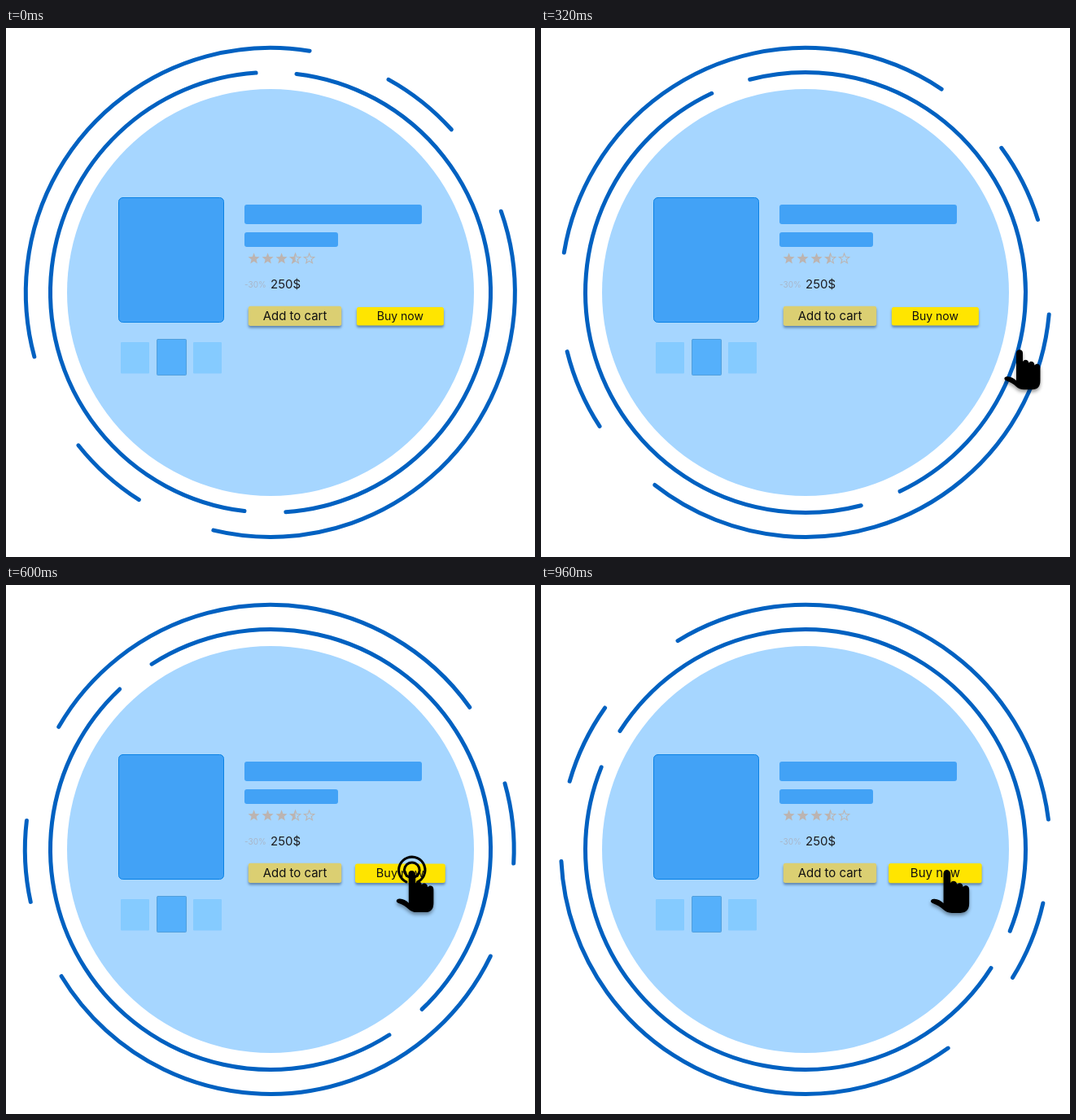
An HTML page with a canvas for the animation above (1 s loop, 650x650 px).

```html
<!DOCTYPE html>
<html lang="en">
<head>
<meta charset="utf-8">
<title>Buy now</title>
<style>
  html, body { margin: 0; width: 100%; height: 100%; overflow: hidden; background: #fff; }
  canvas { display: block; width: 650px; height: 650px; }
</style>
</head>
<body>
<canvas id="stage" width="650" height="650"></canvas>
<script>
const ctx = document.getElementById('stage').getContext('2d');
const LOOP = 1000, STEP = 40;
const RING = '#0061c1', BLUE = '#42a2f6', GREY = '#bcb4b1', INK = '#1c1c1e';
const clamp = v => Math.max(0, Math.min(1, v));
const lerp = (a, b, p) => a + (b - a) * p;

// Standard ease-in-out: cubic-bezier(.42, 0, .58, 1)
function easeInOut(x) {
  if (x <= 0 || x >= 1) return clamp(x);
  let lo = 0, hi = 1, s = 0.5;
  for (let i = 0; i < 20; i++) {
    s = (lo + hi) / 2;
    const bx = 3 * s * (1 - s) * (1 - s) * 0.42 + 3 * s * s * (1 - s) * 0.58 + s * s * s;
    if (bx < x) lo = s; else hi = s;
  }
  return s * s * (3 - 2 * s);
}

function arc(r, from, to, turn) {
  const rad = Math.PI / 180;
  ctx.beginPath();
  ctx.arc(325, 325, r, (from + turn) * rad, (to + turn) * rad);
  ctx.stroke();
}

function box(x, y, w, h, r, fill, line) {
  ctx.beginPath();
  ctx.roundRect(x, y, w, h, r);
  ctx.fillStyle = fill;
  ctx.fill();
  if (line) {
    ctx.strokeStyle = line;
    ctx.lineWidth = 1;
    ctx.stroke();
  }
}

function text(str, x, y, size, fill, align = 'left') {
  ctx.font = `${size}px Inter, sans-serif`;
  ctx.textAlign = align;
  ctx.fillStyle = fill;
  ctx.fillText(str, x, y);
}

function shadow(color, y, blur) {
  ctx.shadowColor = color;
  ctx.shadowOffsetY = y;
  ctx.shadowBlur = blur;
}

function rings(frame) {
  const out = frame * 1.2935, inn = -frame * 1.127;
  ctx.strokeStyle = RING;
  ctx.lineWidth = 5;
  ctx.lineCap = 'round';
  arc(300.7, 164.8, 279.2, out);
  arc(299.2, -61, -42, out);
  arc(300.4, -19.4, 103.5, out);
  arc(301.7, 122.4, 141.5, out);
  arc(270.5, 96.8, 266.2, inn);
  arc(270.5, -83.2, 86, inn);
}

function starPath(x, y, R) {
  ctx.beginPath();
  for (let i = 0; i < 10; i++) {
    const a = i * Math.PI / 5 - Math.PI / 2, r = i % 2 ? R * 0.43 : R;
    ctx.lineTo(x + r * Math.cos(a), y + r * Math.sin(a));
  }
  ctx.closePath();
}

// fill: share of the star that is solid, from the left
function star(x, fill) {
  const y = 283.6;
  ctx.fillStyle = ctx.strokeStyle = GREY;
  ctx.lineWidth = 1.1;
  ctx.save();
  ctx.beginPath();
  ctx.rect(x - 8, y - 8, 16 * fill, 16);
  ctx.clip();
  starPath(x, y, 7.4);
  ctx.fill();
  ctx.restore();
  if (fill < 1) {
    starPath(x, y, 6.5);
    ctx.stroke();
  }
}

function button(label, cx, cy, scale, fill) {
  ctx.save();
  ctx.translate(cx, cy);
  ctx.scale(scale, scale);
  ctx.save();
  shadow('rgba(30,60,100,.5)', 2.5, 3);
  box(-53.5, -11.3, 107, 22.6, 2.5, fill);
  ctx.restore();
  text(label, 0, 4.4, 14, '#111', 'center');
  ctx.restore();
}

function product(hover) {
  ctx.beginPath();
  ctx.arc(325, 325, 250, 0, Math.PI * 2);
  ctx.fillStyle = '#a6d6ff';
  ctx.fill();

  box(138.5, 208.5, 129, 153, 5, BLUE, '#0b82e4');
  box(141, 386, 35, 38.5, 1, '#85cbff');
  box(185.5, 382.5, 36, 44, 1, '#55b0fb', '#519fdc');
  box(230, 386, 35, 38.5, 1, '#85cbff');
  box(293, 217, 218, 24, 3, BLUE);
  box(293, 251, 115, 18, 3, BLUE);

  [1, 1, 1, 0.5, 0].forEach((fill, i) => star(304.6 + i * 17, fill));
  text('-30%', 293, 319, 10, '#a9b6c8');
  text('250$', 325, 320, 15, INK);

  button('Add to cart', 355, 353.9, 1.07, '#dbcf72');
  button('Buy now', 484.4, 354.2, lerp(1, 1.07, hover), '#ffe500');
}

function hand() {
  ctx.beginPath();
  ctx.moveTo(-7.5, 13);
  ctx.lineTo(-7.5, -21);
  ctx.bezierCurveTo(-7.5, -26.3, 0.5, -26.3, 0.5, -21);
  ctx.lineTo(0.5, -10);
  ctx.bezierCurveTo(1.5, -13.5, 7.5, -13.5, 8, -8.5);
  ctx.bezierCurveTo(9.5, -11.5, 14.7, -11, 15, -5.8);
  ctx.bezierCurveTo(17, -8.5, 22, -8, 22, -3);
  ctx.lineTo(22, 13);
  ctx.quadraticCurveTo(22, 24, 12, 24);
  ctx.lineTo(2, 24);
  ctx.quadraticCurveTo(-4, 24, -8, 20);
  ctx.quadraticCurveTo(-12, 16, -20, 13);
  ctx.bezierCurveTo(-24, 11, -21.5, 7.5, -18, 8);
  ctx.quadraticCurveTo(-12, 8.5, -7.5, 13);
  ctx.closePath();
  ctx.fillStyle = '#000';
  ctx.fill();
}

function pointer(frame, hover) {
  const p = easeInOut(frame / 35), scale = lerp(1, 1.07, hover);
  ctx.save();
  ctx.translate(lerp(711, 502.6, p), lerp(478, 377.2, p));
  ctx.scale(scale, scale);
  ctx.save();
  shadow('rgba(0,0,0,.4)', 3, 4);
  hand();
  ctx.restore();
  if (frame >= 34) {
    ctx.globalAlpha = clamp(1 - (frame - 35) / 22);
    ctx.strokeStyle = '#000';
    ctx.lineWidth = 3;
    for (const r of [15.6, 9]) {
      ctx.beginPath();
      // Open at the bottom, where the finger passes
      ctx.arc(-3.7, -26, r, Math.PI * 0.64, Math.PI * 2.36);
      ctx.stroke();
    }
  }
  ctx.restore();
}

function draw(now) {
  const tick = Math.floor((now % LOOP) / STEP);
  // 60 fps motion shown at 25 fps
  const frame = Math.max(0, Math.floor(tick * 2.4 - 0.01));
  const hover = clamp((frame - 31) / 8);
  ctx.clearRect(0, 0, 650, 650);
  rings(frame);
  product(hover);
  pointer(frame, hover);
}

const start = performance.now();
function loop() {
  draw(performance.now() - start);
  requestAnimationFrame(loop);
}
loop();
</script>
</body>
</html>
```
